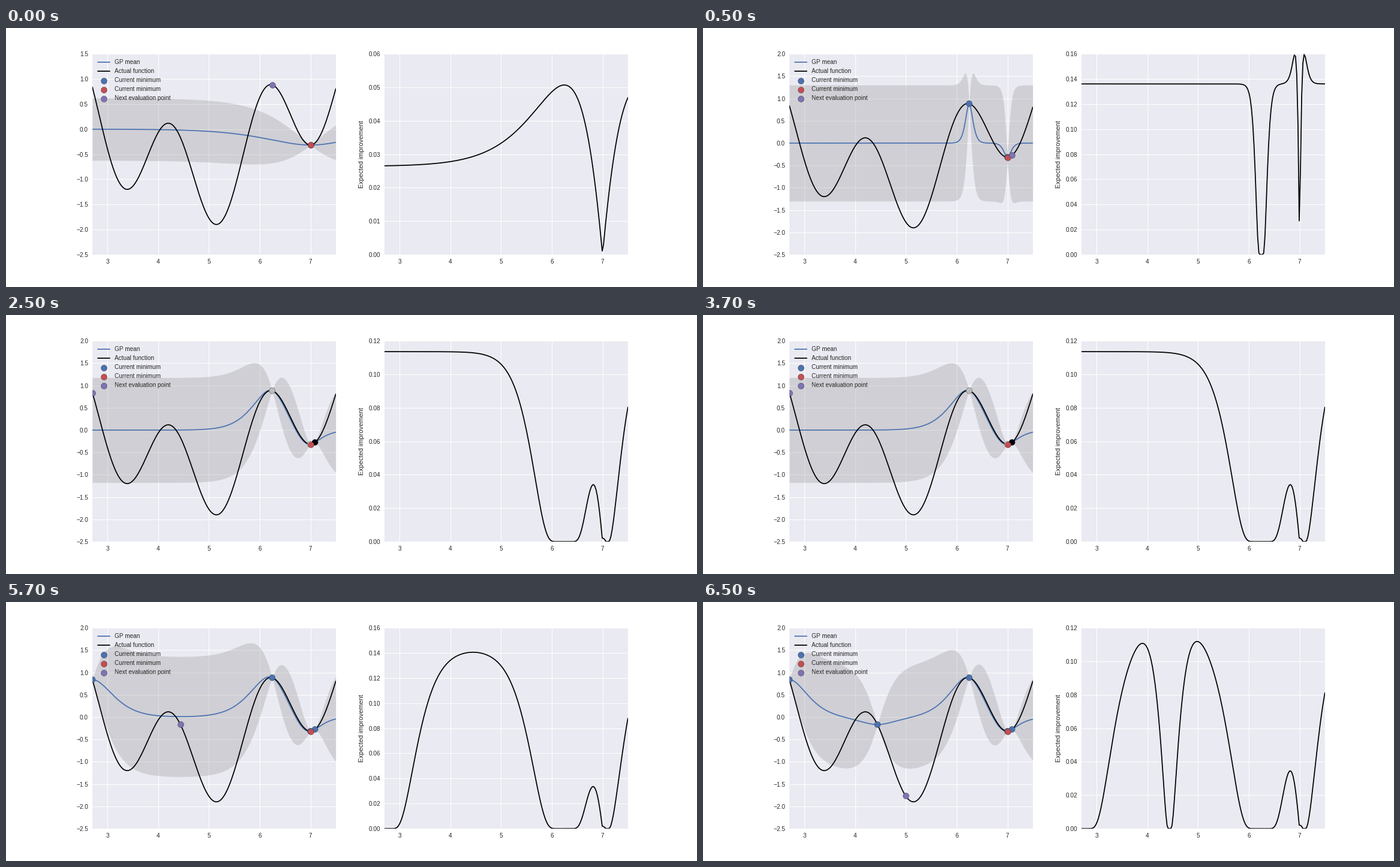
Recreate the animation shown at these times as a matplotlib script. Size 1152 by 432 pixels, loop 8000 ms.

```python
import math

import numpy as np
import matplotlib.pyplot as plt
from matplotlib.animation import FuncAnimation
from matplotlib.lines import Line2D

W, H, DPI = 1152, 432, 72
BLUE, RED, PURPLE, INK = "#4C72B0", "#C44E52", "#8172B2", "0.15"

plt.rcParams.update({
    "font.family": "Liberation Sans",
    "font.size": 10,
    "text.color": INK,
    "text.kerning_factor": 6,
    "axes.facecolor": "#EAEAF2",
    "axes.linewidth": 0,
    "axes.edgecolor": "white",
    "axes.axisbelow": True,
    "axes.grid": True,
    "grid.color": "white",
    "grid.linestyle": "-",
    "grid.linewidth": 1,
    "lines.linewidth": 1.75,
    "lines.solid_capstyle": "round",
    "xtick.color": INK,
    "ytick.color": INK,
    "xtick.labelsize": 10,
    "ytick.labelsize": 10,
    "xtick.major.size": 0,
    "ytick.major.size": 0,
    "xtick.major.pad": 7,
    "ytick.major.pad": 7,
})


def objective(x):
    return np.sin(x) + np.sin(10 / 3 * x)


def matern(a, b, scale):
    s = math.sqrt(5) * np.abs(a[:, None] - b[None, :]) / scale
    return (1 + s + s**2 / 3) * np.exp(-s)


def cost(x, y, scale):
    """Negative log likelihood with the variance profiled out."""
    k = matern(x, x, scale)
    return (len(x) * math.log(y @ np.linalg.solve(k, y))
            + np.linalg.slogdet(k)[1])


def fit_scale(x, y):
    return min(np.geomspace(0.2, 1, 601), key=lambda s: cost(x, y, s))


def posterior(x, y, scale):
    k, kg = matern(x, x, scale), matern(grid, x, scale)
    var = y @ np.linalg.solve(k, y) / len(x)
    mean = kg @ np.linalg.solve(k, y)
    gap = 1 - np.sum(kg * np.linalg.solve(k, kg.T).T, axis=1)
    return mean, np.sqrt(var * np.maximum(gap, 1e-12))


def improvement(mean, sd, best):
    z = (best - mean) / sd
    cdf = np.array([0.5 * math.erfc(-v / math.sqrt(2)) for v in z])
    pdf = np.exp(-z**2 / 2) / math.sqrt(2 * math.pi)
    return (best - mean) * cdf + sd * pdf


grid = np.linspace(2.7, 7.5, 200)
truth = objective(grid)
visited = np.concatenate([[7.0], grid[[147, 182, 0, 72, 95]]])

# The likelihood has no inner optimum for one or two samples
SCALES = [1.0, 0.08, None, None, None]
# top of left axis, top of right axis, right tick step
LIMITS = [(1.5, 0.06, 0.01), (2, 0.16, 0.02), (2, 0.12, 0.02),
          (2, 0.16, 0.02), (2, 0.12, 0.02)]


def build(i):
    x = visited[:i + 1]
    y = objective(x)
    mean, sd = posterior(x, y, SCALES[i] or fit_scale(x, y))
    return x, y, mean, sd, improvement(mean, sd, y.min())


stages = [build(i) for i in range(5)]

fig, (left, right) = plt.subplots(1, 2, figsize=(W / DPI, H / DPI), dpi=DPI,
                                  facecolor="white")
fig.subplots_adjust(left=0.125, right=0.9, bottom=0.125, top=0.9, wspace=0.2)


def px(x, y):
    return x / W, 1 - y / H


def add_legend():
    rows = [("GP mean", BLUE, False), ("Actual function", "black", False),
            ("Current minimum", BLUE, True), ("Current minimum", RED, True),
            ("Next evaluation point", PURPLE, True)]
    for n, (label, color, dot) in enumerate(rows):
        y = 60 + 15 * n
        fig.text(*px(181, y), label, fontsize=10, va="baseline")
        if dot:
            cx, cy = px(163, y - 2.4)
            key = Line2D([cx], [cy], marker="o", ms=10, mfc=color,
                         mec="black", mew=0.3, ls="none")
        else:
            (x0, cy), (x1, _) = px(153, y - 3.2), px(173, y - 3.2)
            key = Line2D([x0, x1], [cy, cy], color=color)
        fig.add_artist(key)


def dots(x, y, color, z):
    left.scatter(x, y, s=100, c=color, edgecolors="black", linewidths=0.3,
                 zorder=z)


def set_axes(ax, low, high, step, digits):
    ticks = np.arange(round((high - low) / step) + 1) * step + low
    labels = [f"{t:.{digits}f}".replace("-", "\u2212") for t in ticks]
    ax.set_xlim(2.7, 7.5)
    ax.set_xticks(range(3, 8))
    ax.set_ylim(low, high)
    ax.set_yticks(ticks, labels)


def draw(k):
    i = (k + 3) // 4
    x, y, mean, sd, gain = stages[i]
    top, gain_top, gain_step = LIMITS[i]

    left.clear()
    left.fill_between(grid, mean - 1.96 * sd, mean + 1.96 * sd,
                      color="grey", alpha=0.25, linewidth=0)
    left.plot(grid, mean, color=BLUE)
    left.plot(grid, truth, color="black")
    # With three samples the dots are shaded in greys
    seen = ["white", "#bcbcbc", "black"] if len(x) == 3 else [BLUE] * len(x)
    best = np.argmin(y)
    dots(x, y, seen, 4)
    dots([x[best]], [y[best]], [RED], 5)
    dots([visited[i + 1]], [objective(visited[i + 1])], [PURPLE], 6)
    set_axes(left, -2.5, top, 0.5, 1)

    right.clear()
    right.plot(grid, gain, color="black")
    set_axes(right, 0, gain_top, gain_step, 2)
    return []


add_legend()
fig.text(*px(596, 211), "Expected improvement", fontsize=11, rotation=90,
         rotation_mode="anchor", ha="center", va="baseline")

anim = FuncAnimation(fig, draw, frames=16, interval=500, repeat=True,
                     repeat_delay=0, blit=False)
plt.show()
```
